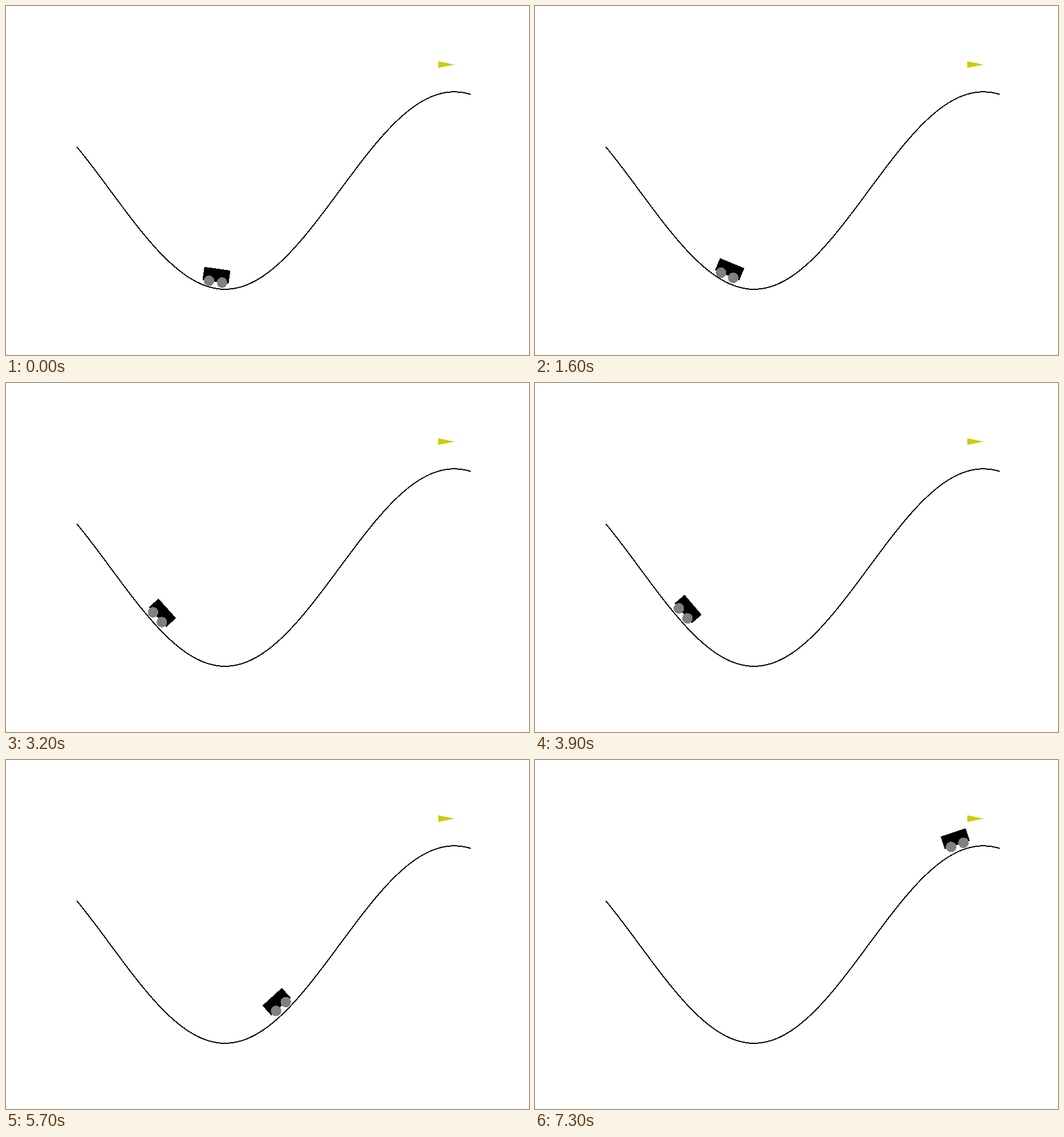
An HTML page that plays this animation: 917x611 px, repeating every 7400 ms.

```html
<!DOCTYPE html>
<html lang="en">
<head>
<meta charset="utf-8">
<title>Mountain car</title>
<style>
  html, body { margin: 0; width: 100%; height: 100%; overflow: hidden; background: #fff; }
  svg { display: block; }
</style>
</head>
<body>
<svg width="917" height="611" viewBox="0 0 917 611" shape-rendering="crispEdges">
  <polyline id="track" fill="none" stroke="#000" stroke-width="2"/>
  <polygon id="flag" fill="#cccc00"/>
  <g id="car">
    <rect x="-20" y="-30" width="40" height="20"/>
    <g fill="#808080">
      <circle cx="10" cy="-10" r="8"/>
      <circle cx="-10" cy="-10" r="8"/>
    </g>
  </g>
</svg>
<script>
const STEP_MS = 100, STEPS = 74;
const MIN_POS = -1.2, MAX_POS = 0.6, FLAG_POS = 0.45;
const UNIT = 384, ZOOM = 1.152, LEFT = 124.2, BOTTOM = 534.3;

const screenX = pos => LEFT + (pos - MIN_POS) * UNIT;
const screenY = pos => BOTTOM - (Math.sin(3 * pos) * 0.45 + 0.55) * UNIT;

// Roll up the left slope: [step, position, velocity]
const backing = [
  [0, -0.571, 0],
  [8, -0.5875, -0.0055],
  [16, -0.6575, -0.0115],
  [24, -0.758, -0.0132],
  [32, -0.854, -0.009],
  [37, -0.8803, -0.00025]
];

function hermite([t0, p0, v0], [t1, p1, v1], t) {
  const h = t1 - t0, s = (t - t0) / h, r = 1 - s;
  return r * r * ((1 + 2 * s) * p0 + s * h * v0)
       + s * s * ((3 - 2 * s) * p1 - r * h * v1);
}

function drive() {
  const positions = [];
  let [turn, pos, velocity] = backing.at(-1);
  for (let step = 0; step < turn; step++) {
    const i = backing.findIndex(key => key[0] > step);
    positions.push(hermite(backing[i - 1], backing[i], step));
  }
  // Full throttle to the right against gravity
  for (let step = turn; step < STEPS; step++) {
    positions.push(pos);
    velocity += 0.0015 - 0.0025 * Math.cos(3 * pos);
    pos += velocity;
  }
  return positions;
}

const byId = id => document.getElementById(id);
const car = byId("car");
const positions = drive();

byId("track").setAttribute("points", Array.from({ length: 100 }, (_, i) => {
  const pos = MIN_POS + (MAX_POS - MIN_POS) * i / 99;
  return `${screenX(pos)},${screenY(pos)}`;
}).join(" "));

const flagX = screenX(FLAG_POS), flagY = screenY(FLAG_POS) - 50 * ZOOM;
byId("flag").setAttribute("points",
  `${flagX},${flagY} ${flagX},${flagY + 10 * ZOOM} ${flagX + 25 * ZOOM},${flagY + 5 * ZOOM}`);

function draw() {
  const pos = positions[Math.floor(performance.now() / STEP_MS) % STEPS];
  const angle = -Math.cos(3 * pos) * 180 / Math.PI;
  car.setAttribute("transform",
    `translate(${screenX(pos)} ${screenY(pos)}) rotate(${angle}) scale(${ZOOM})`);
  requestAnimationFrame(draw);
}
draw();
</script>
</body>
</html>
```
